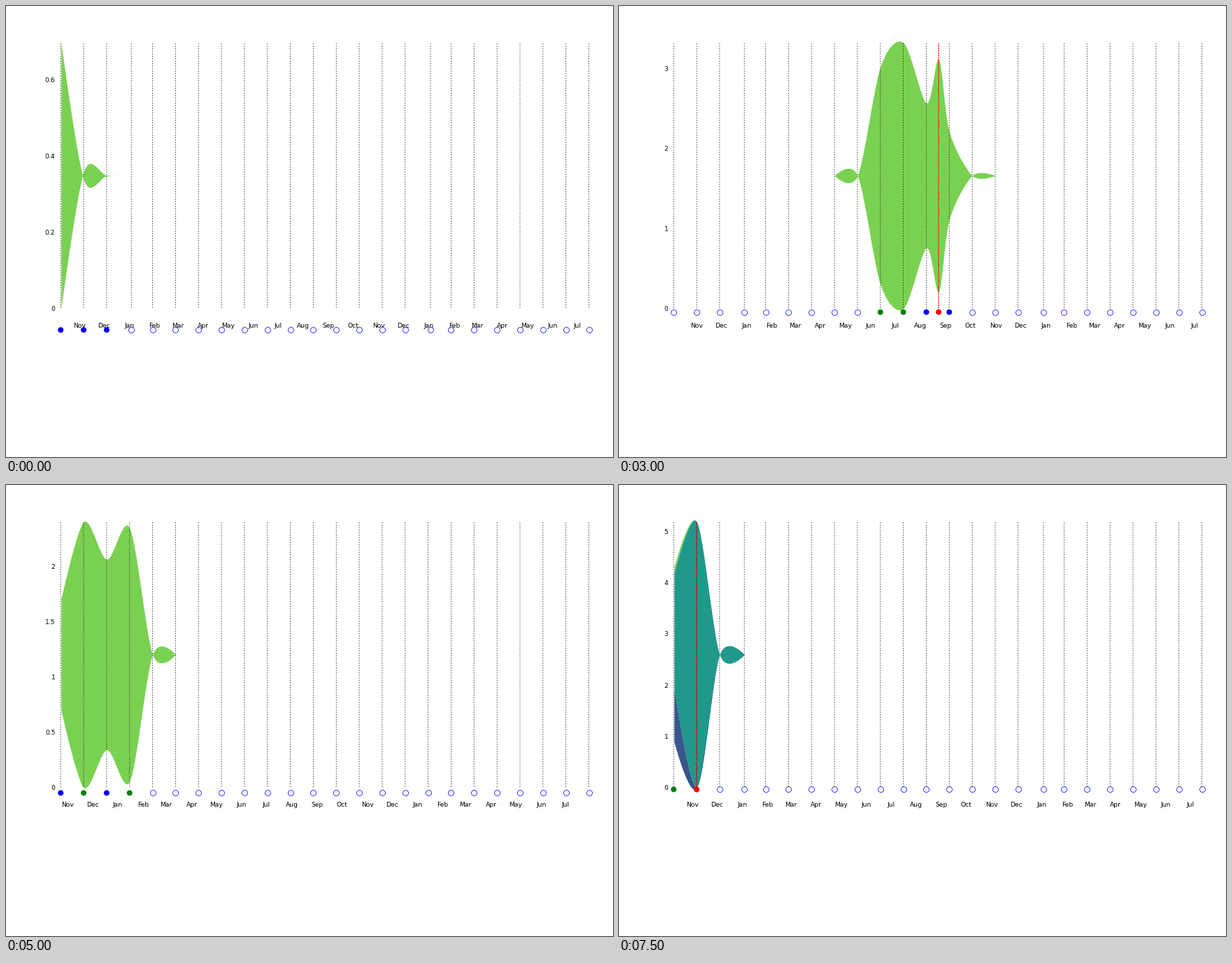
A matplotlib script that plays this animation: 868 by 645 pixels, repeating every 8000 ms.

```python
import itertools

import matplotlib.pyplot as plt
import numpy as np
from matplotlib.animation import FuncAnimation
from matplotlib.patches import Rectangle

W, H, DPI = 868, 645, 64
PX = 72 / DPI  # points per pixel
TOP, BASE, MID, CLIP = 53.5, 433, 242.5, 35
HEIGHT = 380
TENSION = 0.45
MANY = 2.04  # totals above this get a green dot
LIME, GREEN, TEAL, OCEAN, BLUE, PURPLE = (
    "#7ad151", "#35b779", "#20988b", "#2a788e", "#39568c", "#482d7b")

MONTHS = ["Nov", "Dec", "Jan", "Feb", "Mar", "Apr",
          "May", "Jun", "Jul", "Aug", "Sep", "Oct"]
DAYS = [30, 31, 31, 28, 31, 30, 31, 30, 31, 31, 30, 31]
DAY_PX = 1.173
A, B, C = 104.8, 110.8, 88.4  # x of the first month label
FONT = dict(family="DejaVu Sans", fontsize=9.1 * PX, color="black",
            va="baseline", zorder=2)

# Columns at which each layer swells.
SOLO = {LIME: (0,)}
DUO = {LIME: (-1,), TEAL: (0, 1), BLUE: (-0.5,)}
FULL = {
    LIME: (2,),
    GREEN: (0.4, 3, 6.5, 7, 9, 9.5, 10, 12.5, 14.5, 15, 16, 19),
    TEAL: (12, 13, 16),
    OCEAN: (4, 7, 17),
    BLUE: (0.6, 2, 5, 6, 8, 15, 18.4),
    PURPLE: (3, 9, 11),
}

fig = plt.figure(figsize=(W / DPI, H / DPI), dpi=DPI, facecolor="white")
ax = fig.add_axes([0, 0, 1, 1])


def grid(even):
    x = 78.2 + 32.84 * np.arange(24)
    if not even:
        x[3], x[16] = 179.2, 607
    return x


def scene(label, values, start=0, mix=SOLO, event=None, sunk=False, dotted=True):
    """Totals per column; an event is an extra (column, total) marked red."""
    nodes = {start + i: v for i, v in enumerate(values)}
    if event:
        nodes[event[0]] = event[1]
    return dict(label=label, nodes=dict(sorted(nodes.items())), mix=mix,
                event=event, sunk=sunk, dotted=dotted,
                peak=max(map(abs, nodes.values())))


def wander(seed, peak, count):
    v = np.random.RandomState(seed).uniform(0.3, 1, count)
    return [*(peak * v / v.max()), 0, 0]


SPIKE = [0, 0.005, 0.449, 0, 0]
TOTALS = [3.3, 3.62, 2.05, 2.85, 1.33, 0.88, 1.75, 2.3, 2.11, 1.07, 1.16, 1.75,
          1.07, 0.5, -0.51, 1.18, 1.43, 1.28, 0.72, -0.32, 0.01, 0.01, 0.01]

SCENES = [
    scene(A, [0.697, -0.02, -0.002, 0]),
    scene(A, wander(1, 1, 2)),
    scene(A, wander(2, 3.3, 3)),
    scene(B, wander(3, 3.6, 4)),
    scene(A, SPIKE, sunk=True),
    scene(B, wander(4, 1, 3), start=8),
    scene(B, [0, 0, 2.72, 3.32, 1.81, 1.1, 0, 0], start=7,
          event=(11.535, 2.91)),
    scene(B, wander(5, 1.05, 3), start=10),
    scene(B, wander(6, 1.05, 4)),
    scene(B, TOTALS, mix=FULL),
    scene(C, wander(7, 2.4, 4)),
    scene(C, [0, 0, 0.317, -0.236, 0, 0, 0.445, -0.368, 0, 0], dotted=False),
    scene(C, wander(8, 3, 4)),
    scene(C, [3.62, 2.63, 3.2, 2.03, -0.67, 0, 0], event=(3.38, 4.03)),
    scene(A, SPIKE, sunk=True),
    scene(A, [3.41, 5.18, 0, 0], mix=DUO, event=(1, 5.18)),
]


def spline(p, n=60):
    """Cardinal spline through the rows of p, at rest at both ends."""
    m = np.zeros_like(p)
    m[1:-1] = TENSION * (p[2:] - p[:-2])
    t = np.linspace(0, 1, n)[:, None]
    return np.concatenate([
        (1 + 2 * t) * (1 - t) ** 2 * p[i] + t * (1 - t) ** 2 * m[i]
        + t * t * (3 - 2 * t) * p[i + 1] + t * t * (t - 1) * m[i + 1]
        for i in range(len(p) - 1)])


def streams(s, xs, zero, unit):
    cols = np.array(list(s["nodes"]), float)
    total = unit * np.array(list(s["nodes"].values()))
    mid, half = (zero, total) if s["sunk"] else (MID, total / 2)

    weights = np.array([
        sum(np.exp(-((cols - peak) / 0.6) ** 2) for peak in peaks) + 1e-9
        for peaks in s["mix"].values()])
    share = np.cumsum(weights / weights.sum(axis=0), axis=0)
    share = np.vstack([np.zeros(len(cols)), share])

    x = np.interp(cols, np.arange(24), xs)
    x[cols == 0] += 0.6
    curve = spline(np.column_stack([x, (mid + (2 * share - 1) * half).T]))
    for j, color in enumerate(s["mix"], start=1):
        shape = ax.fill_between(curve[:, 0], curve[:, j], curve[:, j + 1],
                                color=color, lw=0, zorder=1)
        shape.set_clip_path(Rectangle((0, CLIP), W, H, transform=ax.transData))


def tick_step(peak):
    steps = (m * 10.0 ** e for e in range(-2, 2) for m in (1, 2, 5))
    return next(step for step in steps if peak / step <= 6)


def axis_labels(s, zero, unit):
    days = itertools.accumulate(itertools.cycle(DAYS), initial=0)
    for name, day in zip(itertools.islice(itertools.cycle(MONTHS), 21), days):
        ax.text(s["label"] + DAY_PX * day, 460.5, name, ha="center", **FONT)
    step = tick_step(s["peak"])
    sign = -1 if s["sunk"] else 1
    for k in range(int(s["peak"] / step) + 1):
        v = sign * k * step
        ax.text(70.4, zero - unit * v + 3.4, f"{v:.3g}", ha="right", **FONT)


def rule(x, color, width, dash):
    ax.plot([x, x], [TOP, BASE], color=color, lw=width * PX, zorder=3,
            dashes=dash, dash_capstyle="butt", snap=False)


def dot(x, y, fill, edge="none"):
    ax.scatter(x, y, s=(8 * PX) ** 2, facecolors=fill, edgecolors=edge,
               lw=0.75 * PX, zorder=5, snap=False)


def dots(s, xs, y):
    for i, x in enumerate(xs):
        v = s["nodes"].get(i, 0)
        if v:
            dot(x, y, "green" if v > MANY else "blue")
        else:
            dot(x, y, "white", "blue")


def draw(n):
    ax.clear()
    ax.set(xlim=(0, W), ylim=(H, 0))
    ax.axis("off")
    s = SCENES[n]
    xs = grid(s["label"] == C)
    zero = 52 if s["sunk"] else BASE
    unit = HEIGHT / s["peak"]
    dot_y = zero + 22.5 / s["peak"] - 2

    streams(s, xs, zero, unit)
    axis_labels(s, zero, unit)
    for x in xs:
        rule(x, "#222222", 0.8, (2, 2.4))
    if s["dotted"]:
        dots(s, xs, dot_y)
    if s["event"]:
        x = np.interp(s["event"][0], np.arange(24), xs)
        rule(x, "red", 1.4, (1.4, 0.9))
        dot(x, dot_y, "red")
    return []


anim = FuncAnimation(fig, draw, frames=len(SCENES), init_func=lambda: [],
                     interval=500, repeat=True, repeat_delay=0)
plt.show()
```
